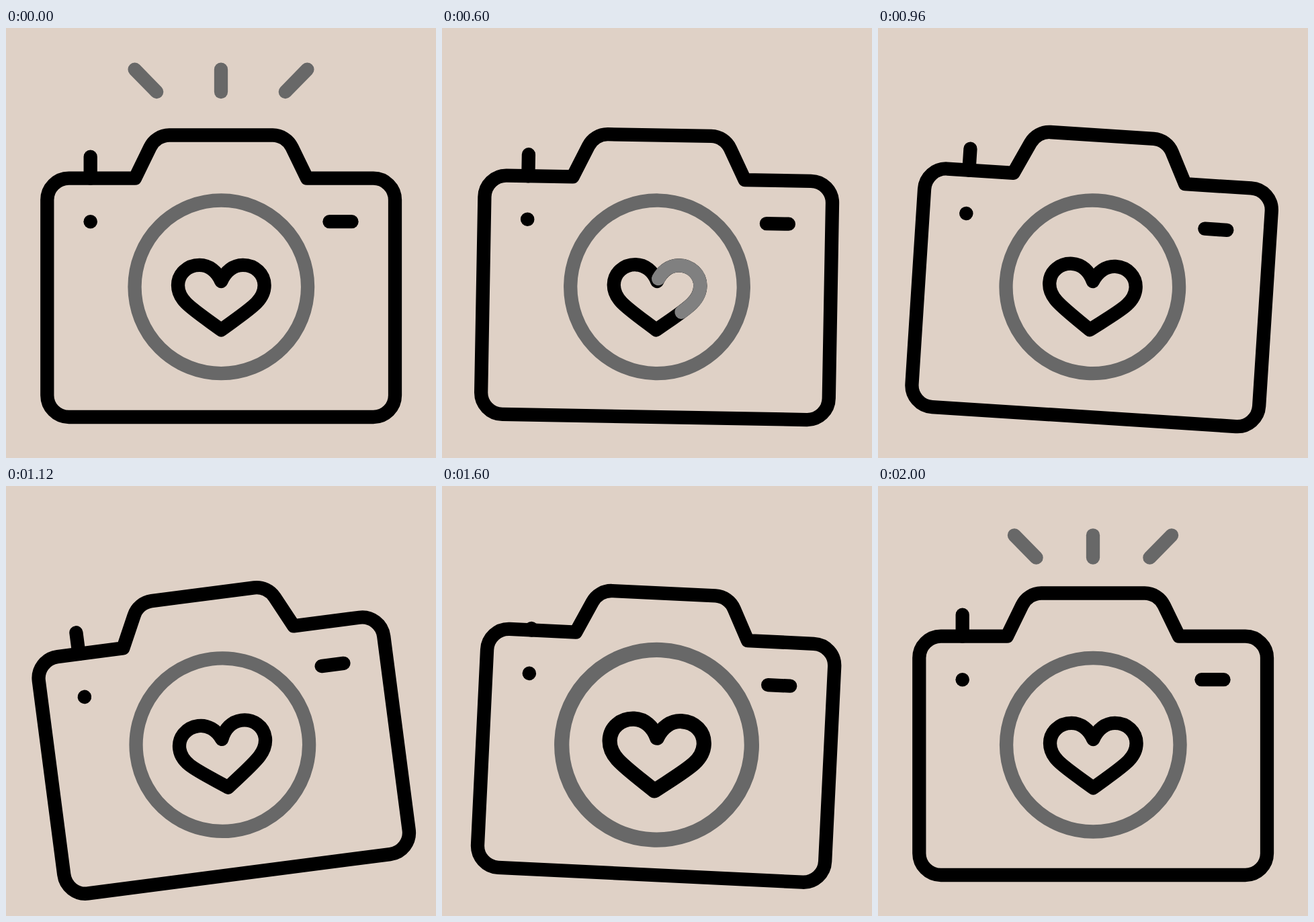
An HTML page that plays this animation: 640x640 px, repeating every 2040 ms.

```html
<!DOCTYPE html>
<html lang="en">
<head>
<meta charset="utf-8">
<title>Camera</title>
<style>
  html, body { margin: 0; width: 100%; height: 100%; overflow: hidden; background: #dfd1c6; }
  svg { display: block; width: 100%; height: 100%; }
  path, circle { fill: none; stroke: #000; stroke-width: 20.3; stroke-linecap: round; stroke-linejoin: round; }
  .gray { stroke: #686868; }
  #trace { stroke: #808080; }
  #dot { fill: #000; stroke: none; }
</style>
</head>
<body>
<svg viewBox="0 0 640 640">
  <g id="rays">
    <path class="gray"/><path class="gray"/><path class="gray"/>
  </g>
  <g id="camera">
    <path d="M93.5 223.7H192L214.4 177.7A32 32 0 0 1 243 159.5H397A32 32 0 0 1 425.6 177.7L448 223.7H546.5A32.3 32.3 0 0 1 579 256V546.5A32.3 32.3 0 0 1 546.5 579H93.5A32.3 32.3 0 0 1 61.3 546.5V256A32.3 32.3 0 0 1 93.5 223.7Z"/>
    <path id="button"/>
    <path d="M481.5 288.2H514.5"/>
    <circle id="dot" cx="125.7" cy="288.2" r="10.3"/>
    <circle id="lens" class="gray" cx="320.3" cy="385.3" r="128.8"/>
    <g id="heart">
      <path id="outline" d="M320.3 377C314 362 302 352.8 288 352.8C270 352.8 256 366 256 383C256 406 276 417 320.3 449.3C364.6 417 384.6 406 384.6 383C384.6 366 370.6 352.8 352.6 352.8C338.6 352.8 326.6 362 320.3 377"/>
      <path id="trace" pathLength="1"/>
    </g>
  </g>
</svg>
<script>
const LOOP = 2040, STEP = 40;
const $ = id => document.getElementById(id);
const rays = [...$('rays').children];
const [camera, button, lens, heart, trace] = ['camera', 'button', 'lens', 'heart', 'trace'].map($);
trace.setAttribute('d', $('outline').getAttribute('d'));

// Each track is a list of [time, value] keys joined by smooth easing.
const tracks = {
  tilt: [[506, 0], [882, 6.6], [1153, -8], [1473, 3.9], [1830, 0]],
  buttonTop: [[1150, 191.7], [1400, 221], [1600, 221], [1820, 191.7]],
  lensScale: [[1359, 1], [1693, 1.12], [2035, 1]],
  heartScale: [[1430, 1], [1680, 1.12], [1970, 1]],
  traceEnd: [[0, 0], [640, 1]],
  traceStart: [[210, 0], [880, 1]]
};

function valueAt(keys, t) {
  if (t <= keys[0][0]) return keys[0][1];
  for (let i = 1; i < keys.length; i++) {
    const [t0, a] = keys[i - 1], [t1, b] = keys[i];
    if (t < t1) {
      const u = (t - t0) / (t1 - t0);
      return a + (b - a) * u * u * (3 - 2 * u);
    }
  }
  return keys[keys.length - 1][1];
}

const scaleAbout = (k, x, y) => `translate(${x} ${y}) scale(${k}) translate(${-x} ${-y})`;
const show = (el, on) => el.setAttribute('visibility', on ? 'visible' : 'hidden');

// The rays leave the camera top and fly off the upper edge of the stage.
function drawRays(t) {
  const rise = 0.29 * (t > 1000 ? t - LOOP : t);
  const base = 131;
  const top = 61.7 - rise, bottom = Math.min(95 - rise, base);
  rays.forEach((ray, i) => {
    const side = i - 1;
    const x = y => 320 + side * (95.8 + (95 - y) * 0.98);
    ray.setAttribute('d', `M${x(top)} ${top}L${x(bottom)} ${bottom}`);
    show(ray, top < bottom && bottom > -12);
  });
}

function draw(t) {
  const v = {};
  for (const name in tracks) v[name] = valueAt(tracks[name], t);
  camera.setAttribute('transform', `rotate(${v.tilt} 320 369.5)`);
  button.setAttribute('d', `M125.7 ${v.buttonTop}V223.7`);
  lens.setAttribute('transform', scaleAbout(v.lensScale, 320.3, 385.3));
  heart.setAttribute('transform', scaleAbout(v.heartScale, 320.3, 402));
  const length = v.traceEnd - v.traceStart;
  show(trace, length > 0.0005);
  trace.setAttribute('stroke-dasharray', `${Math.max(length, 0)} 2`);
  trace.setAttribute('stroke-dashoffset', -v.traceStart);
  drawRays(t);
}

const begin = performance.now();
function tick() {
  const t = (performance.now() - begin) % LOOP;
  draw(Math.floor(t / STEP) * STEP);
  requestAnimationFrame(tick);
}
tick();
</script>
</body>
</html>
```
